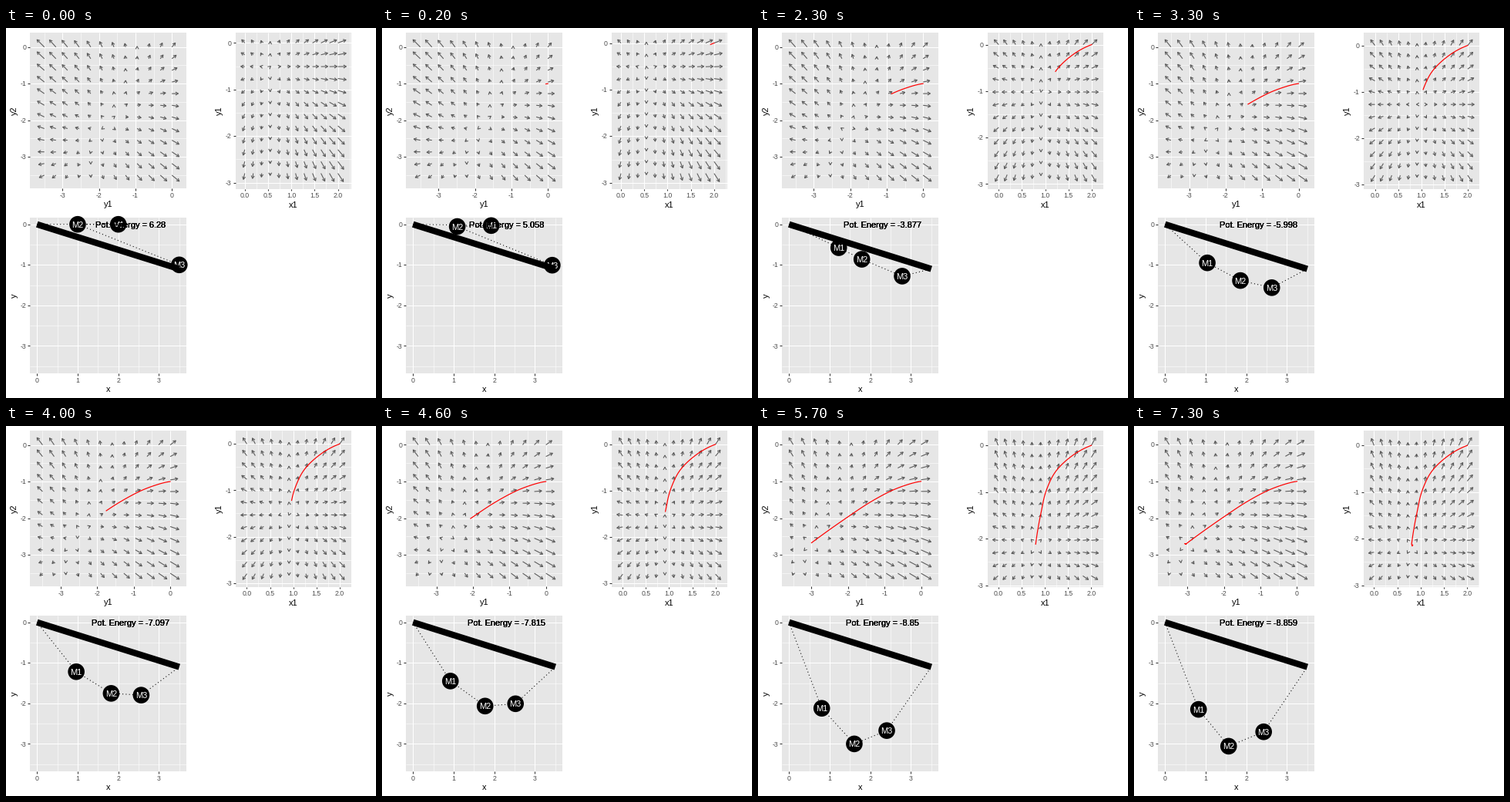
A matplotlib script for the animation above (7.5 s loop, 480 by 480 pixels).

```python
import numpy as np
import matplotlib
import matplotlib.pyplot as plt
from matplotlib.animation import FuncAnimation
from matplotlib.collections import LineCollection
from matplotlib.patches import Circle, Rectangle

matplotlib.rcParams["font.family"] = "Liberation Sans"

SIZE, DPI = 480, 80
PT = 72 / DPI                      # points per pixel
FRAMES, INTERVAL = 75, 100
THIN = 1.07                        # default stroke in pixels

# Descent waypoints: step, then x1, y1, x2, y2, x3, y3, energy
WAY = np.array([
    [0, 2.000, 0.000, 1.000, 0.000, 3.500, -1.000, 6.280],
    [11, 1.602, -0.213, 1.440, -0.345, 3.120, -1.080, 0.367],
    [23, 1.223, -0.577, 1.792, -0.862, 2.784, -1.278, -3.877],
    [33, 1.040, -0.950, 1.855, -1.386, 2.627, -1.562, -5.998],
    [46, 0.920, -1.448, 1.773, -2.065, 2.522, -2.008, -7.815],
    [57, 0.806, -2.120, 1.606, -2.998, 2.405, -2.670, -8.850],
])
REST = np.array([0.825, -2.147, 1.565, -3.055, 2.427, -2.700, -8.859])
WOBBLE = np.array([0.4, 0.6, -0.4, 1.0, 0.4, -0.6, 0.0])
SETTLE = 65
ANCHOR = (3.5, -1.1)

STEPS, VALUES = WAY[:, 0], WAY[:, 1:]
ARC = np.r_[0, np.cumsum(np.linalg.norm(np.diff(VALUES[:, :6], axis=0), axis=1))]
SLOPES = np.gradient(VALUES, ARC, axis=0, edge_order=2)


def state(step):
    """Positions and energy after a number of descent steps."""
    if step > STEPS[-1]:
        fade = max(0, SETTLE - step) / 8
        return REST + 0.02 * fade * (-1) ** step * WOBBLE
    s = np.interp(step, STEPS, ARC)
    i = min(np.searchsorted(ARC, s, side="right") - 1, len(ARC) - 2)
    h = ARC[i + 1] - ARC[i]
    u = (s - ARC[i]) / h
    return ((1 + 2 * u) * (1 - u) ** 2 * VALUES[i] + u * (1 - u) ** 2 * h * SLOPES[i]
            + u * u * (3 - 2 * u) * VALUES[i + 1] + u * u * (u - 1) * h * SLOPES[i + 1])


TRAIL = np.array([state(n) for n in range(FRAMES)])

GRID_LEFT = np.meshgrid(np.linspace(-3.5, 0, 12), np.linspace(-3.5, 0, 12))
GRID_RIGHT = np.meshgrid(np.linspace(0, 2, 12), np.linspace(-2.8, 0, 12))


def field_left(a, b, s):
    """Energy slope for the heights of the second and third mass."""
    return 2.5 * (a + 0.95 - 0.47 * s[1] - 0.4 * b), 2.2 * (b + 1.3 - 0.455 * a)


def field_right(a, b, s):
    """Energy slope for the position of the first mass."""
    return 2.556 * (a - 0.51 * s[2]), 2.556 * (b + 0.538 - 0.529 * s[3])


fig = plt.figure(figsize=(SIZE / DPI, SIZE / DPI), dpi=DPI, facecolor="white")
ax = fig.add_axes([0, 0, 1, 1])


class Panel:
    """A grey plot area mapping data to stage pixels."""

    def __init__(self, rect, xr, yr):
        self.left, self.top, self.right, self.bottom = rect
        pad_x, pad_y = 0.05 * (xr[1] - xr[0]), 0.05 * (yr[1] - yr[0])
        self.xr = xr[0] - pad_x, xr[1] + pad_x
        self.yr = yr[0] - pad_y, yr[1] + pad_y

    def x(self, v):
        t = (np.asarray(v) - self.xr[0]) / (self.xr[1] - self.xr[0])
        return self.left + t * (self.right - self.left)

    def y(self, v):
        t = (np.asarray(v) - self.yr[0]) / (self.yr[1] - self.yr[0])
        return self.bottom - t * (self.bottom - self.top)

    def draw(self, xname, yname, xstep=1.0):
        w, h = self.right - self.left, self.bottom - self.top
        ax.add_patch(Rectangle((self.left, self.top), w, h, fc="#E6E6E6", lw=0))
        minor, major, ticks = [], [], []
        for step, lim, upright in ((xstep, self.xr, True), (1.0, self.yr, False)):
            for k in range(int(np.ceil(2 * lim[0] / step)),
                           int(np.floor(2 * lim[1] / step)) + 1):
                v = k * step / 2
                lines = minor if k % 2 else major
                if upright:
                    p = self.x(v)
                    lines.append([(p, self.top), (p, self.bottom)])
                else:
                    p = self.y(v)
                    lines.append([(self.left, p), (self.right, p)])
                if k % 2:
                    continue
                name = f"{v:.1f}" if step < 1 else f"{v:.0f}"
                if upright:
                    ticks.append([(p, self.bottom), (p, self.bottom + 2.8)])
                    label(p, self.bottom + 8.6, name, 8.8, "#4D4D4D")
                else:
                    ticks.append([(self.left - 2.8, p), (self.left, p)])
                    label(self.left - 5, p, name, 8.8, "#4D4D4D", ha="right")
        segments(minor, "white", THIN / 2, 1)
        segments(major, "white", THIN, 1.1)
        segments(ticks, "#333333", THIN, 1.2)
        label((self.left + self.right) / 2, self.bottom + 20.4, xname, 11)
        label(self.left - 20.5, (self.top + self.bottom) / 2, yname, 11,
              rotation=90, va="center")


def label(x, y, text, size, color="black", ha="center", z=5, va="baseline", **kw):
    """Text whose capitals are centred on y, unless va says otherwise."""
    drop = 0.36 * size if va == "baseline" else 0
    ax.text(x, y + drop, text, fontsize=size * PT, color=color, ha=ha, va=va,
            zorder=z, **kw)


def segments(lines, color, width, z):
    ax.add_collection(LineCollection(lines, colors=color, linewidths=width * PT,
                                     zorder=z, capstyle="butt"), autolim=False)


def arrows(panel, x0, y0, x1, y1):
    px0, py0, px1, py1 = panel.x(x0), panel.y(y0), panel.x(x1), panel.y(y1)
    turn = np.arctan2(py0 - py1, px0 - px1)
    lines = []
    for a, b, c, d, t in zip(*(v.ravel() for v in (px0, py0, px1, py1, turn))):
        barbs = [(c + 4 * np.cos(t + s), d + 4 * np.sin(t + s))
                 for s in (-np.pi / 6, np.pi / 6)]
        lines += [[(a, b), (c, d)], [barbs[0], (c, d), barbs[1]]]
    segments(lines, "#595959", THIN, 2)


def field_panel(n, grid, field, cols, rect, names, xstep=1.0, fixed=False):
    x0, y0 = grid
    gx, gy = field(x0, y0, TRAIL[n])
    # arrows shrink where the horizontal slope vanishes
    norm = np.hypot(gx, gy) + 1e-9
    scale = 0.07 * np.abs(gx) ** 0.4 * norm ** 0.3 / norm
    x1, y1 = x0 + gx * scale, y0 + gy * scale
    xr = min(x0.min(), x1.min()), max(x0.max(), x1.max())
    yr = min(y0.min(), y1.min()), max(y0.max(), y1.max())
    if fixed:
        mid = (rect[0] + rect[2]) / 2
        half = (rect[3] - rect[1]) * (xr[1] - xr[0]) / (yr[1] - yr[0]) / 2
        rect = mid - half, rect[1], mid + half, rect[3]
    panel = Panel(rect, xr, yr)
    panel.draw(*names, xstep)
    arrows(panel, x0, y0, x1, y1)
    path = TRAIL[:n + 1, cols]
    ax.plot(panel.x(path[:, 0]), panel.y(path[:, 1]), color="red",
            lw=1.2 * PT, zorder=3)


def mass_panel(n):
    panel = Panel((31, 245.5, 234, 448), (0, 3.5), (-3.5, 0))
    panel.draw("x", "y")
    s = TRAIL[n]
    xs = panel.x(np.r_[0, s[0:6:2], ANCHOR[0]])
    ys = panel.y(np.r_[0, s[1:6:2], ANCHOR[1]])
    ax.plot(xs, ys, color="black", lw=THIN * PT, ls=(0, (1, 3)),
            dash_capstyle="butt", zorder=2)
    for i in (3, 2, 1):
        z = 4 - 0.1 * i
        ax.add_patch(Circle((xs[i], ys[i]), 10.8, fc="black", lw=0, zorder=z))
        label(xs[i], ys[i], f"M{i}", 11, "white", z=z + 0.05)
    ax.plot(xs[[0, -1]], ys[[0, -1]], color="black", lw=8.2 * PT,
            solid_capstyle="butt", zorder=4.5)
    text = f"Pot. Energy = {round(s[6], 3):g}"
    for _ in range(4):             # stacked text looks heavier
        label(panel.x(2.3), panel.y(0), text, 11, z=6)


def draw(n):
    ax.cla()
    ax.set_xlim(0, SIZE)
    ax.set_ylim(SIZE, 0)
    ax.axis("off")
    field_panel(n, GRID_LEFT, field_left, [3, 5], (31, 6, 234, 208), ("y1", "y2"))
    field_panel(n, GRID_RIGHT, field_right, [0, 1], (299, 6, 447, 208.5),
                ("x1", "y1"), xstep=0.5, fixed=True)
    mass_panel(n)
    return []


anim = FuncAnimation(fig, draw, frames=FRAMES, interval=INTERVAL,
                     init_func=lambda: draw(0), repeat=True, repeat_delay=0)
plt.show()
```
